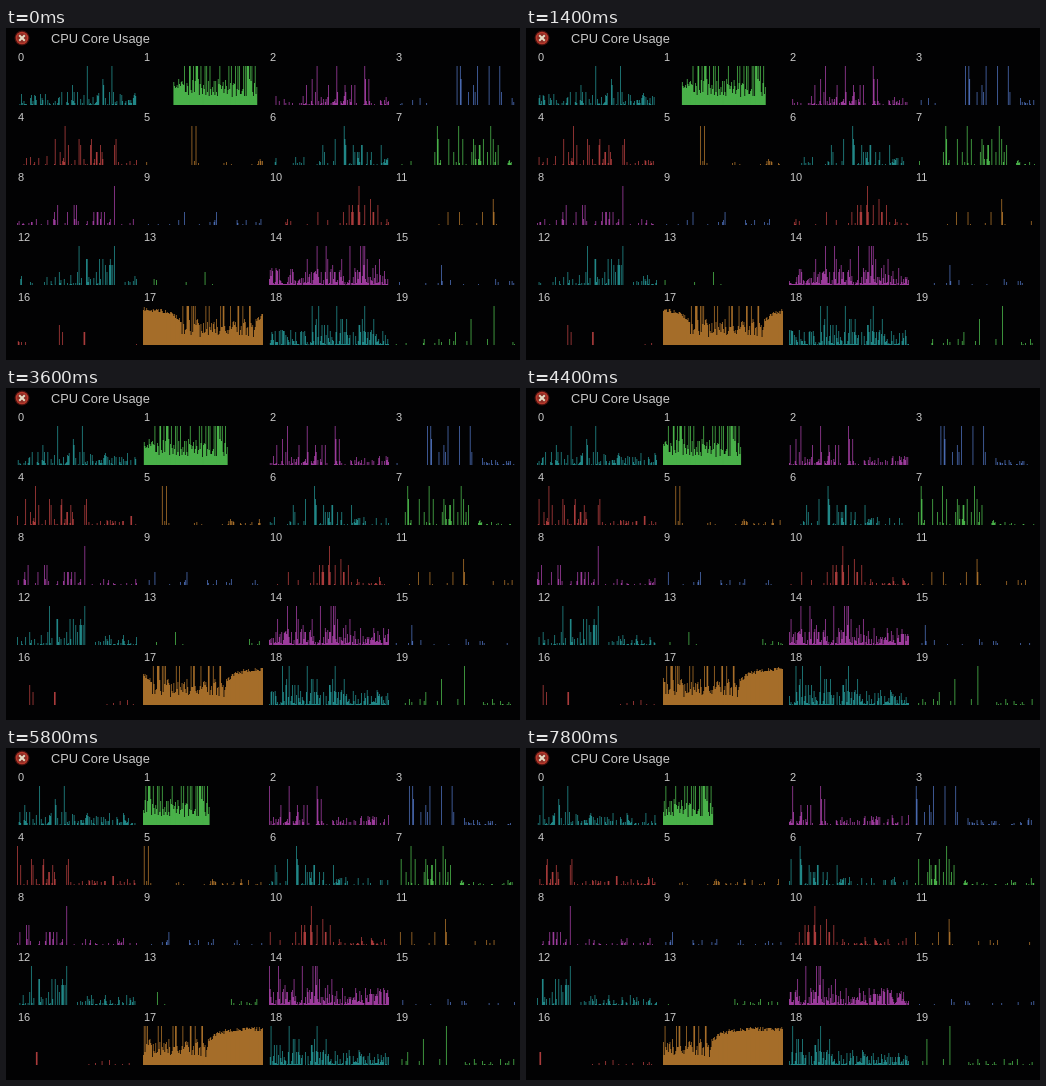
These frames come from a looping animation (514x332 px, 8000 ms). An HTML page with a canvas:

```html
<!DOCTYPE html>
<html lang="en">
<head>
<meta charset="utf-8">
<title>CPU Core Usage</title>
<style>
  html, body { margin: 0; width: 100%; height: 100%; overflow: hidden; background: #020203; }
  canvas, svg { position: absolute; left: 0; top: 0; width: 514px; height: 332px; }
  text { font: 11px "Liberation Sans", Arial, sans-serif; fill: #cacaca; }
  .title { font-size: 12.8px; }
</style>
</head>
<body>
<canvas id="bars" width="514" height="332"></canvas>
<svg id="labels" viewBox="0 0 514 332">
  <circle cx="16" cy="10" r="7.5" fill="#43120f"/>
  <circle cx="16" cy="10" r="6.3" fill="#b8392c"/>
  <circle cx="16" cy="10" r="4.8" fill="#8a2c24"/>
  <path d="M13.2 7.2l5.6 5.6m0-5.6l-5.6 5.6" stroke="#e6dcc4" stroke-width="2"/>
  <text class="title" x="45" y="15">CPU Core Usage</text>
</svg>
<script>
const STEP_MS = 200, STEPS = 40, SAMPLES_PER_STEP = 2;
const WIDTH = 120, FULL = 39, VISIBLE = 146;
const PITCH = WIDTH / VISIBLE, TOTAL = VISIBLE + STEPS * SAMPLES_PER_STEP;
const COLORS = ['#208686', '#48b048', '#9a3a9a', '#4868ae', '#a83a3a', '#a46c28'];
const ctx = document.getElementById('bars').getContext('2d');
const labels = document.getElementById('labels');

function seeded(seed) {
  return () => {
    seed = (seed + 0x6D2B79F5) | 0;
    let t = Math.imul(seed ^ (seed >>> 15), 1 | seed);
    t = (t + Math.imul(t ^ (t >>> 7), 61 | t)) ^ t;
    return ((t ^ (t >>> 14)) >>> 0) / 4294967296;
  };
}

// 0 to 1 to 0 across the busy period shared by all cores.
const ramp = (from, to, u) => Math.min(1, Math.max(0, (u - from) / (to - from)));
const busy = u => ramp(30, 46, u) * (1 - ramp(96, 114, u));

// Background hum, a busy period of one third to two thirds load, and a few full peaks.
const mixed = (hum, burst, ...peaks) => (u, random) => {
  if (peaks.some(peak => u <= peak && peak < u + PITCH)) return FULL;
  if (random() < burst * busy(u)) return FULL / 6 * (2 + Math.floor(3 * random() ** 1.5));
  const chance = u < 112 ? hum ** 1.5 : hum;
  return random() < chance ? 1 + (3 + 14 * hum) * random() ** 2 : 0;
};

const ragged = random => random() < .24 ? FULL : 8 + 18 * random();

const blockLoad = (u, random) => u > 30 && u < 114 ? ragged(random) : 0;

// Near full load on both sides of a ragged stretch, sagging towards its edges.
const heavyLoad = (u, random) => {
  const gap = Math.max(38 - u, u - 112);
  return gap < 0 ? ragged(random) : 38 - 13 * Math.exp(-gap / 10) - 4 * random();
};

const loads = [
  mixed(.6, .1, 70, 95),
  blockLoad,
  mixed(.45, .14, 48, 68, 96),
  mixed(.25, .06, 62, 65, 83, 94, 105),
  mixed(.35, .18, 48),
  mixed(.2, .02, 49, 53),
  mixed(.3, .14, 75),
  mixed(.25, .18, 42, 64, 96),
  mixed(.25, .16, 97),
  mixed(.12, .03),
  mixed(.3, .16, 90),
  mixed(.12, .07),
  mixed(.45, .15, 62, 97),
  mixed(.15, .02),
  mixed(.95, .25, 48, 57, 81, 92, 94, 96),
  mixed(.12, .02),
  mixed(.12, .06),
  heavyLoad,
  mixed(.85, .2, 43, 50, 68, 96),
  mixed(.2, .03, 99),
];

const cores = loads.map((load, id) => {
  const random = seeded(id * 977 + 41);
  return {
    left: 11 + id % 4 * 126,
    base: 77 + Math.floor(id / 4) * 60,
    color: COLORS[id % COLORS.length],
    samples: Array.from({ length: TOTAL }, (_, i) => Math.round(load(i * PITCH, random))),
  };
});

cores.forEach(({ left, base }, id) => {
  const label = document.createElementNS(labels.namespaceURI, 'text');
  label.setAttribute('x', left + 1);
  label.setAttribute('y', base - 44);
  label.textContent = id;
  labels.append(label);
});

function draw(step) {
  ctx.clearRect(0, 0, 514, 332);
  // Adding coverage keeps neighbouring bars seamless.
  ctx.globalCompositeOperation = 'lighter';
  for (const { samples, left, base, color } of cores) {
    ctx.fillStyle = color;
    for (let i = 0; i < VISIBLE; i++) {
      const height = samples[step * SAMPLES_PER_STEP + i];
      ctx.fillRect(left + i * PITCH, base - height, PITCH, height);
    }
  }
}

function tick(now) {
  draw(Math.floor(now / STEP_MS) % STEPS);
  requestAnimationFrame(tick);
}
draw(0);
requestAnimationFrame(tick);
</script>
</body>
</html>
```
